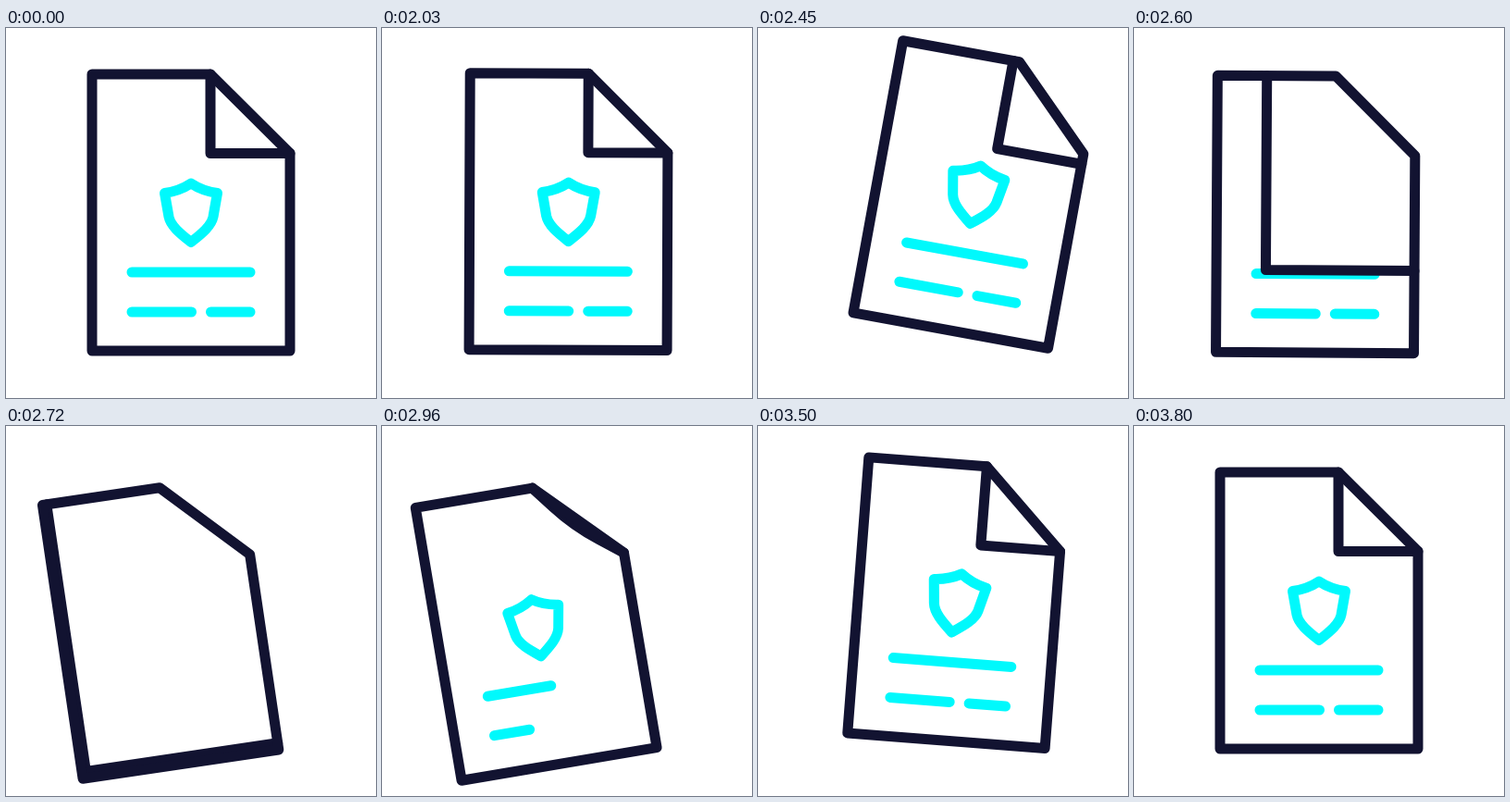
Recreate the animation shown at these times as an HTML page with a canvas. Size 400 by 400 pixels, loop 3.86 s.

```html
<!DOCTYPE html>
<html lang="en">
<head>
<meta charset="utf-8">
<title>Document with shield</title>
<style>
html, body { margin: 0; width: 100%; height: 100%; overflow: hidden; background: #fff; }
canvas { display: block; }
</style>
</head>
<body>
<canvas id="stage" width="400" height="400"></canvas>
<script>
const LOOP = 3860, START = 2030, STEP = 30, TURNED = 2760;
const INK = '#121331', CYAN = '#00f9fc';
const LEFT = 93, RIGHT = 307, TOP = 50, BOTTOM = 349, FOLD_X = 221, FOLD_Y = 135.5;
const MID_X = 200, MID_Y = 199.5;
const ctx = document.getElementById('stage').getContext('2d');

const mix = (a, b, k) => a + (b - a) * k;
const part = (t, from, to) => Math.min(1, Math.max(0, (t - from) / (to - from)));
const smooth = (t, from, to) => {
  const u = part(t, from, to);
  return u * u * (3 - 2 * u);
};
const easeOut = (t, from, to) => 1 - (1 - part(t, from, to)) ** 2;

// Eases from one [time, value] stop to the next.
const through = stops => t => stops.reduce((v, [end, next], i) =>
  i ? mix(v, next, smooth(t, stops[i - 1][0], end)) : next, 0);

const tilt = through([[1995, 0], [2410, 11], [2790, -10.3], [2890, -10.3], [3430, 5], [3760, 0]]);
const swing = through([[2960, 0], [3220, -14], [3430, 7], [3650, 0]]);
const grow = through([[2700, 0], [3020, 1.08], [3230, 1.08], [3560, 1]]);

function spin(deg, scale = 1) {
  ctx.translate(MID_X, MID_Y);
  ctx.rotate(deg * Math.PI / 180);
  ctx.scale(scale, scale);
  ctx.translate(-MID_X, -MID_Y);
}

function stroke(d, color) {
  ctx.strokeStyle = color;
  ctx.stroke(new Path2D(d));
}

function bar(x, end, y, k) {
  if (k > 0) stroke(`M${x} ${y}H${mix(x, end, k)}`, CYAN);
}

function shield(scale, deg) {
  ctx.save();
  spin(deg, scale);
  stroke('M200 168C191 174 182 177 171.5 178.5L176 204C178 214 188 222 200 231.5'
    + 'C212 222 222 214 224 204L228.5 178.5C218 177 209 174 200 168Z', CYAN);
  ctx.restore();
}

// The folded corner grows until it covers the whole sheet.
function slidingFold(k) {
  const x = mix(FOLD_X, LEFT, k), y = mix(FOLD_Y, BOTTOM, k);
  const edge = `M${x} ${TOP}V${y}H${RIGHT}`;
  ctx.fillStyle = '#fff';
  ctx.fill(new Path2D(`${edge}V${FOLD_Y}L${FOLD_X} ${TOP}Z`));
  stroke(edge, INK);
}

// A new corner bends out of the diagonal and sharpens.
function bendingFold(k) {
  const x = mix((FOLD_X + RIGHT) / 2, FOLD_X, k);
  const y = mix((TOP + FOLD_Y) / 2, FOLD_Y, k);
  const r = Math.min(.5, (1 - k) * 2.4);
  stroke(`M${FOLD_X} ${TOP}L${mix(x, FOLD_X, r)} ${mix(y, TOP, r)}`
    + `Q${x} ${y} ${mix(x, RIGHT, r)} ${mix(y, FOLD_Y, r)}L${RIGHT} ${FOLD_Y}`, INK);
}

function draw(t) {
  const turned = t >= TURNED;
  // The shift runs slightly ahead of the tilt.
  const lead = tilt(t + 16);

  ctx.clearRect(0, 0, 400, 400);
  ctx.save();
  ctx.lineWidth = 11;
  ctx.lineCap = ctx.lineJoin = 'round';
  ctx.translate(3.6 * lead, -2 * lead);
  spin(tilt(t));
  shield(turned ? grow(t) : 1, swing(t));
  bar(136, 264, 264, turned ? easeOut(t, 2740, 3420) : 1);
  bar(136, 200.5, 307, turned ? easeOut(t, 2780, 3270) : 1);
  bar(221.5, 264, 307, turned ? easeOut(t, 3110, 3640) : 1);
  if (turned) bendingFold(smooth(t, 2840, 3375));
  else slidingFold(smooth(t, 2400, TURNED));
  stroke(`M${LEFT} ${TOP}H${FOLD_X}L${RIGHT} ${FOLD_Y}V${BOTTOM}H${LEFT}Z`, INK);
  ctx.restore();
}

const origin = performance.now();
function tick() {
  const t = (performance.now() - origin) % LOOP;
  // Motion advances in steps of 30 ms.
  draw(t < START ? 0 : START + STEP * Math.floor((t - START) / STEP));
  requestAnimationFrame(tick);
}
tick();
</script>
</body>
</html>
```
